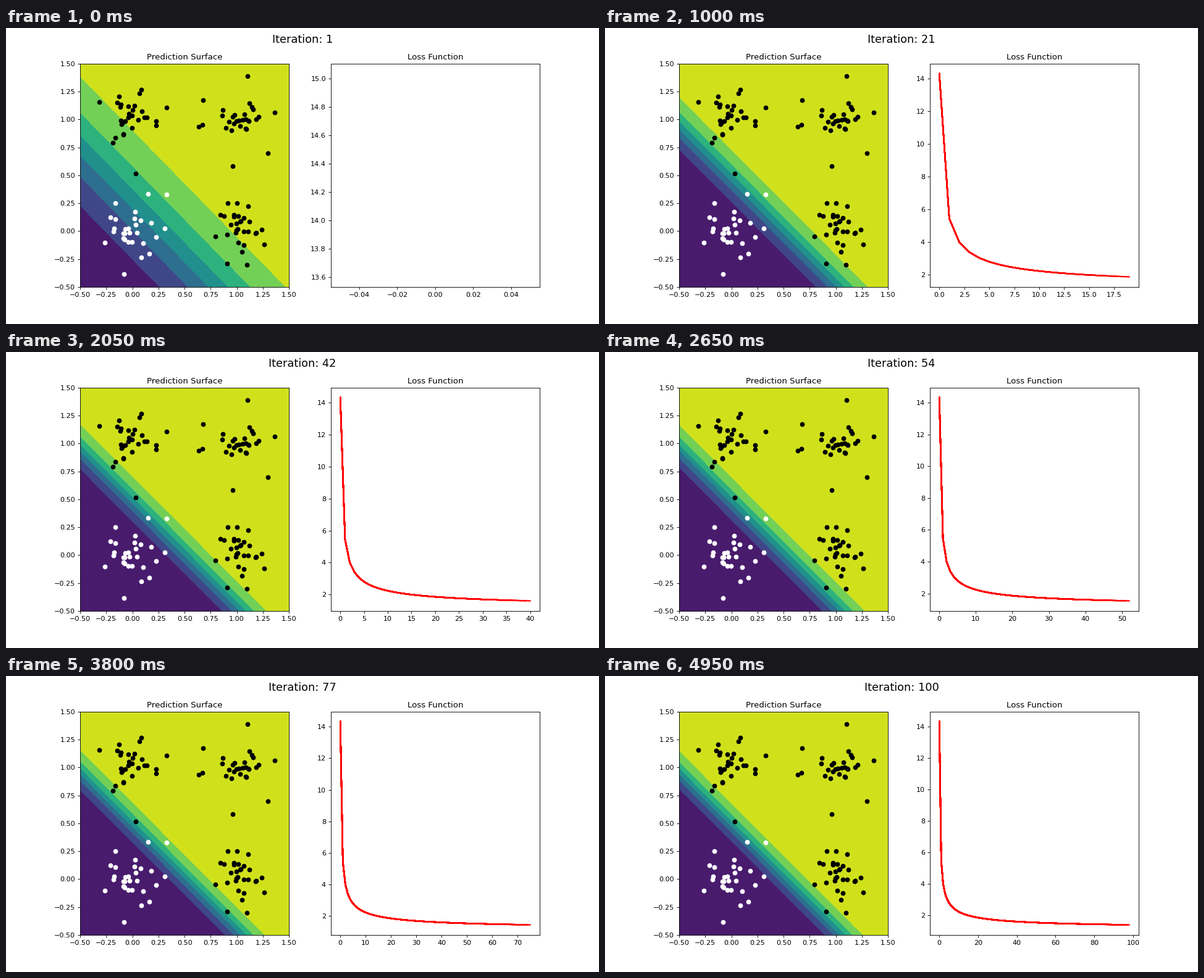
Write a matplotlib script that moves like this. It is 960 px wide and 480 px high and loops after 5000 ms.

```python
import numpy as np
import matplotlib.pyplot as plt
from matplotlib.animation import FuncAnimation
from matplotlib.collections import LineCollection

FRAMES = 100
INTERVAL = 50
POINTS = 30
SPREAD = 0.11

plt.rcParams.update({"font.family": "DejaVu Sans", "font.size": 10,
                     "figure.subplot.bottom": 0.125})

# Outermost points of each cluster; the rest scatter around its corner.
outliers = {
    (0, 0): [(.33, .33), (.15, .335), (.31, .025), (-.265, -.105), (-.08, -.385)],
    (0, 1): [(-.315, 1.155), (.07, 1.235), (.33, 1.105), (.23, .945), (.03, .515)],
    (1, 0): [(.915, .25), (1.11, .225), (.795, -.05), (1.26, -.12), (1.095, -.3)],
    (1, 1): [(1.105, 1.39), (1.36, 1.06), (.635, .935), (1.295, .695), (.96, .58)],
}

grid_x, grid_y = np.meshgrid(np.linspace(-0.5, 1.5, 50),
                             np.linspace(-0.5, 1.5, 50))
levels = np.arange(8) * 0.15

# Training loss: a steep first step, then a power-law decay.
steps = np.arange(FRAMES)
loss = np.where(steps == 0, 14.318,
                1.1 + 4.35 * np.maximum(steps, 1.0) ** -0.583)
curve = np.column_stack([steps, loss])


def make_cluster(rng, corner):
    edge = np.array(outliers[corner])
    core = rng.normal(corner, SPREAD, (POINTS - len(edge), 2))
    return np.vstack([edge, core])


def predict(i):
    """Sigmoid output of the classifier after training step i."""
    age = (i + 2) / 2
    weight = 3.4 + 2.1 * np.log(age)
    slope = 0.936 + 0.021 / age
    offset = 0.968 - 0.228 * age ** -0.87
    return 1 / (1 + np.exp(-weight * (grid_y - offset + slope * (grid_x + 0.5))))


def padded(low, high):
    pad = 0.05 * (high - low)
    return low - pad, high + pad


fig, (ax_map, ax_loss) = plt.subplots(1, 2, figsize=(12, 6), dpi=80)
title = fig.suptitle("", fontsize=16)
ax_map.set_title("Prediction Surface")
ax_loss.set_title("Loss Function")

rng = np.random.default_rng(4)
for corner in outliers:
    xs, ys = make_cluster(rng, corner).T
    ax_map.scatter(xs, ys, color="black" if any(corner) else "white", zorder=2)

lines = LineCollection([], colors="red", linewidths=2, zorder=2,
                       capstyle="projecting", joinstyle="round")
ax_loss.add_collection(lines, autolim=False)
surfaces = []


def draw(i):
    title.set_text(f"Iteration: {i + 1}")

    while surfaces:
        surfaces.pop().remove()
    surfaces.append(ax_map.contourf(grid_x, grid_y, predict(i), levels,
                                    cmap="viridis", antialiased=False))
    ax_map.set(xlim=(-0.5, 1.5), ylim=(-0.5, 1.5))

    # Every earlier curve stays underneath the newest one.
    lines.set_segments([curve[:n] for n in range(2, i + 1)])
    last = max(i, 1) - 1
    if last == 0:
        x_range, y_range = (-0.05, 0.05), (0.95 * loss[0], 1.05 * loss[0])
    else:
        x_range, y_range = (0, last), (loss[last], loss[0])
    ax_loss.set(xlim=padded(*x_range), ylim=padded(*y_range))


anim = FuncAnimation(fig, draw, frames=FRAMES, interval=INTERVAL,
                     init_func=lambda: None, repeat=True, repeat_delay=0)
plt.show()
```
